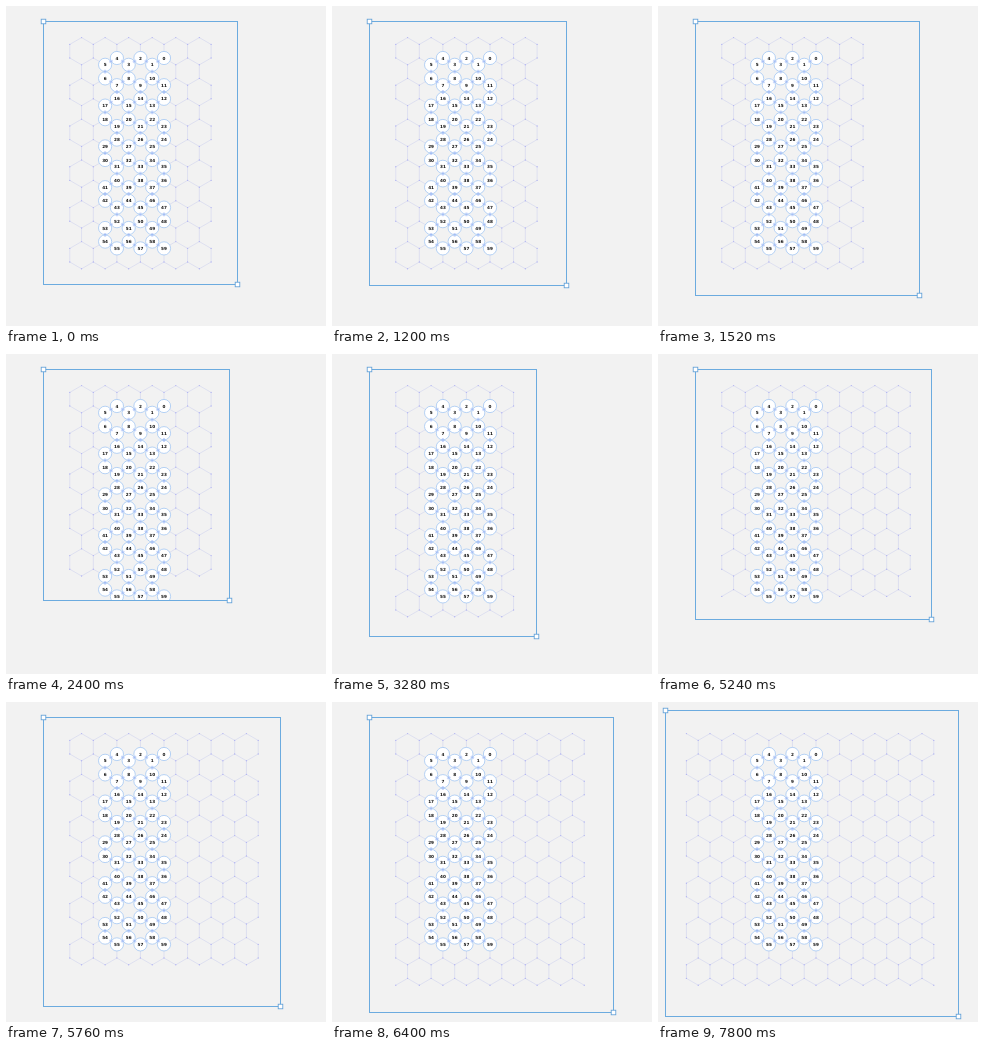
An HTML page that plays this animation: 320x320 px, repeating every 8000 ms.

```html
<!DOCTYPE html>
<html lang="en">
<head>
<meta charset="utf-8">
<title>Resizable hex grid</title>
<style>
  html, body { margin: 0; width: 100%; height: 100%; overflow: hidden; background: #f2f2f2; }
  svg { display: block; width: 100%; height: 100%; }
  path { fill: none; }
  #lines { stroke: #d1d4ee; stroke-width: .6; }
  #dots { stroke: #b4b6f2; stroke-width: 1.4; stroke-linecap: round; }
  #links { stroke: #8fa8f4; stroke-width: 2; stroke-opacity: .45; }
  #frame { fill: none; stroke: #6cabdf; }
  .handle { fill: #fff; stroke: #5a9cd6; stroke-width: .8; }
  circle { fill: #fff; stroke: #98c1f2; stroke-width: .7; }
  text { font: bold 4.2px "DejaVu Sans", sans-serif; fill: #111; text-anchor: middle; }
</style>
</head>
<body>
<svg viewBox="0 0 320 320">
  <clipPath id="clip"><rect id="window"/></clipPath>
  <g clip-path="url(#clip)">
    <path id="lines"/>
    <path id="dots"/>
    <g id="cells"></g>
    <path id="links"/>
    <g id="labels"></g>
  </g>
  <rect id="frame"/>
  <rect class="handle" id="start" width="4.6" height="4.6"/>
  <rect class="handle" id="end" width="4.6" height="4.6"/>
</svg>
<script>
const LOOP = 8000, STEP = 40;
const SIDE = 13.6, COL = SIDE * Math.sqrt(3) / 2, ROW = SIDE * 1.5;
const ORIGIN = { x: 158, y: 52 };
const PAD = 15, RADIUS = 6.6;
const CELL_COLS = 6, CELL_ROWS = 10;

// Strokes: start time, end time and where the corner arrives.
const topLeft = { from: [38, 15.5], strokes: [[7400, 7800, 8, 9]] };
const bottomRight = {
  from: [231.5, 278.5],
  strokes: [
    [1160, 1520, 262, 290], [1520, 1840, 276, 303],
    [2120, 2400, 224, 247],
    [2920, 3280, 205, 283],
    [3920, 4240, 293, 317], [4240, 4440, 297, 307],
    [4680, 4920, 274, 258],
    [5200, 5400, 274, 297],
    [5640, 5800, 275, 307],
    [6000, 6160, 275, 310],
    [6360, 6400, 282, 311], [6400, 6600, 301, 315]
  ]
};

const $ = id => document.getElementById(id);
const attrs = (el, values) => {
  for (const name in values) el.setAttribute(name, values[name]);
};
const isOdd = n => Math.abs(n % 2) === 1;
const clamp = u => Math.min(1, Math.max(0, u));

function cornerAt({ from, strokes }, t) {
  return strokes.reduce(([x, y], [start, end, toX, toY]) => {
    const u = clamp((t - start) / (end - start));
    return [x + (toX - x) * u, y + (toY - y) * u];
  }, from);
}

const boxAt = t => [...cornerAt(topLeft, t), ...cornerAt(bottomRight, t)];

// A drag is released where no further stroke follows on directly.
const releases = ({ strokes }) => strokes
  .filter((s, i) => !strokes[i + 1] || strokes[i + 1][0] > s[1])
  .map(s => s[1]);
const dropTimes = [...releases(bottomRight), ...releases(topLeft)];

// Alternate columns of each row sit half a side lower.
const isLow = (col, row) => isOdd(col) !== isOdd(row);
const at = (col, row) => [
  ORIGIN.x + col * COL,
  ORIGIN.y + row * ROW + (isLow(col, row) ? SIDE / 2 : 0)
];

function lattice(left, right, top, bottom) {
  const nodes = [], edges = [];
  for (let r = top; r <= bottom; r++) {
    for (let c = left; c <= right; c++) {
      const p = at(c, r);
      nodes.push(p);
      if (c < right) edges.push([p, at(c + 1, r)]);
      if (r < bottom && isLow(c, r)) edges.push([p, at(c, r + 1)]);
    }
  }
  return { nodes, edges };
}

const segment = ([a, b]) => `M${a}L${b}`;

function drawGrid([x0, y0, x1, y1]) {
  const { nodes, edges } = lattice(
    Math.ceil((x0 + PAD - ORIGIN.x) / COL),
    Math.floor((x1 - PAD - ORIGIN.x) / COL),
    Math.ceil((y0 + PAD - ORIGIN.y) / ROW),
    Math.floor((y1 - PAD - ORIGIN.y - SIDE / 2) / ROW)
  );
  attrs($("lines"), { d: edges.map(segment).join("") });
  attrs($("dots"), { d: nodes.map(p => `M${p}h.01`).join("") });
}

function drawCells() {
  let circles = "", labels = "";
  for (let n = 0; n < CELL_COLS * CELL_ROWS; n++) {
    const row = Math.floor(n / CELL_COLS), i = n % CELL_COLS;
    const [x, y] = at(isOdd(row) ? i + 1 - CELL_COLS : -i, row);
    circles += `<circle cx="${x}" cy="${y}" r="${RADIUS}"/>`;
    labels += `<text x="${x}" y="${y + 1.5}">${n}</text>`;
  }
  $("cells").innerHTML = circles;
  $("labels").innerHTML = labels;

  // Tint the middle of each edge, where neighbouring circles meet.
  const { edges } = lattice(1 - CELL_COLS, 0, 0, CELL_ROWS - 1);
  const mix = (a, b, u) => a.map((v, j) => v + (b[j] - v) * u);
  const middles = edges.map(([a, b]) => [mix(a, b, .36), mix(a, b, .64)]);
  attrs($("links"), { d: middles.map(segment).join("") });
}

let drawnDrop = -1;
function render(now) {
  const t = Math.floor((now % LOOP) / STEP) * STEP;
  const [x0, y0, x1, y1] = boxAt(t).map(v => Math.round(v) - .5);
  const area = { x: x0, y: y0, width: x1 - x0, height: y1 - y0 };
  attrs($("frame"), area);
  attrs($("window"), area);
  attrs($("start"), { x: x0 - 2.3, y: y0 - 2.3 });
  attrs($("end"), { x: x1 - 2.3, y: y1 - 2.3 });

  // The grid refits only when a corner is released.
  const drop = Math.max(0, ...dropTimes.filter(d => d <= t));
  if (drop !== drawnDrop) {
    drawGrid(boxAt(drop));
    drawnDrop = drop;
  }
}

drawCells();
const began = performance.now();
function tick() {
  render(performance.now() - began);
  requestAnimationFrame(tick);
}
tick();
</script>
</body>
</html>
```
